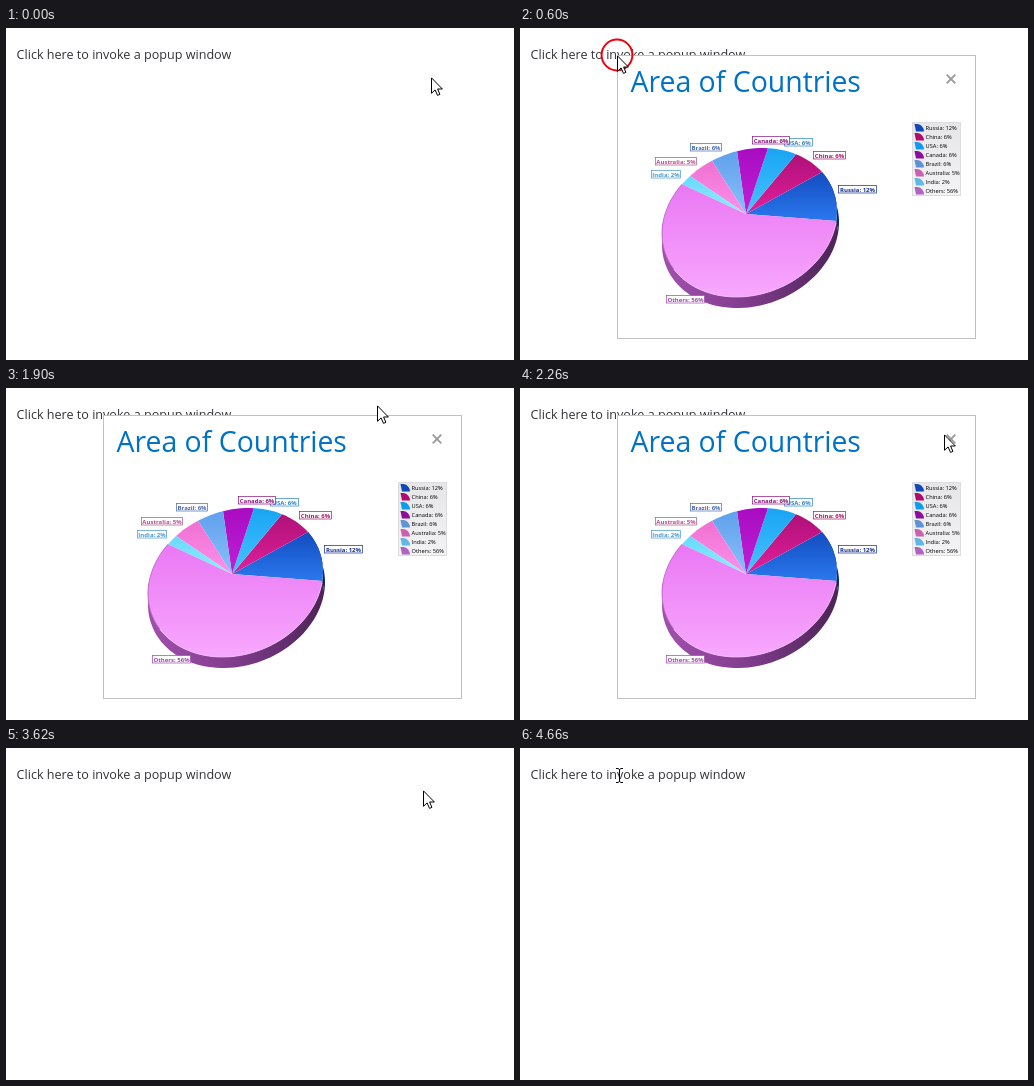
These frames come from a looping animation (508x332 px, 4690 ms). An HTML page:

```html
<!DOCTYPE html>
<html lang="en">
<head>
<meta charset="utf-8">
<title>Popup window</title>
<style>
  html, body { margin: 0; width: 100%; height: 100%; overflow: hidden; background: #fff; }
  svg { display: block; width: 508px; height: 332px; font-family: "Open Sans", "Noto Sans", sans-serif; }
</style>
</head>
<body>
<svg viewBox="0 0 508 332">
  <defs>
    <linearGradient id="rim">
      <stop offset="0" stop-color="#a050ac"/>
      <stop offset=".45" stop-color="#843e90"/>
      <stop offset="1" stop-color="#4c2456"/>
    </linearGradient>
    <linearGradient id="legendFill" x2="0" y2="1">
      <stop offset="0" stop-color="#e6e6e8"/>
      <stop offset="1" stop-color="#f3f3f5"/>
    </linearGradient>
  </defs>
  <text x="10.6" y="31" font-size="12.6" fill="#333338">Click here to invoke a popup window</text>
  <g id="popup">
    <rect x="97.5" y="27.5" width="358" height="283" fill="#fff" stroke="#c0c0c0"/>
    <text x="110.5" y="64.4" font-size="28.4" fill="#0072c6">Area of Countries</text>
    <path d="M426.7 46.7l8.6 8.6m0-8.6l-8.6 8.6" stroke="#999" stroke-width="1.8"/>
    <g id="pie"></g>
    <g id="labels" font-size="6" font-weight="700" text-anchor="middle"></g>
    <g id="legend" font-size="5.7">
      <rect x="392.5" y="94.5" width="48" height="73" fill="url(#legendFill)" stroke="#dcdcdf"/>
    </g>
  </g>
  <circle id="ring" fill="none" stroke="#f0000c" stroke-width="2"/>
  <path id="arrow" d="M.5.9V16.3L4.1 12.9 6.5 18.4 8.9 17.4 6.6 12H11.4Z" fill="#fff" stroke="#000"/>
  <path id="beam" d="M-3 -6.5H-1L.5 -5.5 2 -6.5H4M-3 7.5H-1L.5 6.5 2 7.5H4M.5 -5.5V6.5" fill="none" stroke="#000"/>
  <path id="hand" d="M-.5 12.5V2Q1 -1 2.5 2V8Q5 6 6 8 8.5 7 9 9 11 9 10.5 12V15L8.5 18V21.5H0V19L-5 13Q-6 9.5 -3 10.5Z" fill="#fff" stroke="#000"/>
</svg>
<script>
const $ = id => document.getElementById(id);

function add(parent, tag, attrs, text = '') {
  const node = document.createElementNS('http://www.w3.org/2000/svg', tag);
  for (const key in attrs) node.setAttribute(key, attrs[key]);
  node.textContent = text;
  parent.append(node);
  return node;
}

// Pie chart: angles in degrees, label box as left, top, width
const slices = [
  { name: 'Russia', share: 12, from: -34, to: 7.4, fill: ['#134cc0', '#2a78ee'], ink: '#14308c', legend: '#1048b4', box: [318, 157, 39] },
  { name: 'China', share: 6, from: -57.9, to: -34, fill: ['#b01078', '#e0209c'], ink: '#a8106c', legend: '#b00c6c', box: [293, 123, 33] },
  { name: 'USA', share: 6, from: -77.8, to: -57.9, fill: ['#18a4f4', '#48c4ff'], ink: '#2a84cc', legend: '#109cec', box: [264, 110, 29] },
  { name: 'Canada', share: 6, from: -98.2, to: -77.8, fill: ['#a80cc0', '#c020d8'], ink: '#88107c', legend: '#8c0c9c', box: [232, 108, 38] },
  { name: 'Brazil', share: 6, from: -115.4, to: -98.2, fill: ['#60a0ec', '#88c0fc'], ink: '#4868b4', legend: '#5c94d4', box: [170, 115, 32] },
  { name: 'Australia', share: 5, from: -132.8, to: -115.4, fill: ['#f070d0', '#fc90ec'], ink: '#b0508c', legend: '#cc60b0', box: [135, 129, 42] },
  { name: 'India', share: 2, from: -140.5, to: -132.8, fill: ['#68d8fc', '#90f0ff'], ink: '#4898cc', legend: '#60b8e8', box: [131, 142, 30] },
  { name: 'Others', share: 56, from: 7.4, to: 219.5, fill: ['#ea78f4', '#f8a8fe'], ink: '#9c48a8', legend: '#b064c0', box: [146, 267, 39] }
];

// Tilted ellipse; depth 1 is the bottom edge of the disc
function rimPoint(deg, depth) {
  const a = deg * Math.PI / 180;
  return [
    229.5 + 87.5 * Math.cos(a) + depth * (1 + Math.cos(a)),
    194.5 + 74.5 * Math.sin(a - .15) + depth * 11
  ];
}

function arc(from, to, depth = 0) {
  const count = Math.ceil(Math.abs(to - from) / 3);
  return Array.from({ length: count + 1 }, (_, i) =>
    rimPoint(from + (to - from) * i / count, depth));
}

const line = points => 'M' + points.map(p => p.map(v => v.toFixed(2))).join('L');

function drawSide(from, to, fill) {
  add($('pie'), 'path', { d: line([...arc(from, to), ...arc(to, from, 1)]), fill });
}
drawSide(-34, 7.4, '#0a2468');
drawSide(7.4, 190, 'url(#rim)');

slices.forEach(({ name, share, from, to, fill, legend }, i) => {
  const gradient = add(document.querySelector('defs'), 'linearGradient', { id: 'fill' + i, x2: 0, y2: 1 });
  fill.forEach((color, n) => add(gradient, 'stop', { offset: n, 'stop-color': color }));
  add($('pie'), 'path', { d: line([[226, 186], ...arc(from, to)]), fill: `url(#fill${i})` });

  const row = 100 + i * 9;
  add($('legend'), 'path', { d: `M394.5 ${row - 4}h3q6 1 6.5 7.5h-8Z`, fill: legend });
  add($('legend'), 'text', { x: 405.6, y: row + 2 }, `${name}: ${share}%`);
});
add($('pie'), 'path', { d: line(arc(150, 219.5)), fill: 'none', stroke: '#b45cc0', 'stroke-width': .8 });
add($('pie'), 'path', { d: line(arc(9, 150)), fill: 'none', stroke: '#f4bcfa', 'stroke-width': .8 });

// Canada's label overlaps the one for USA
for (const { name, share, ink, box: [x, y, width] } of slices) {
  add($('labels'), 'rect', { x: x + .5, y: y + .5, width: width - 1, height: 7.5, fill: '#fff', stroke: ink, 'stroke-width': .7 });
  add($('labels'), 'text', { x: x + width / 2, y: y + 6.5, fill: ink }, `${name}: ${share}%`);
}

// Pointer timeline: each key holds until the next one
const LOOP = 4690, OPEN = 600, CLOSE = 3030;
const keys = [];
const move = (start, step, shape, ...points) =>
  points.forEach(([x, y], i) => keys.push({ time: start + i * step, x, y, shape }));

move(0, 0, 'arrow', [425, 49]);
move(90, 0, 'beam', [99, 27]);
move(OPEN, 0, 'arrow', [97, 27]);
move(1120, 60, 'beam', [102, 26], [115, 24], [137, 21]);
move(1300, 60, 'arrow', [164, 17], [191, 14], [217, 12], [240, 10], [262, 8], [282, 7],
  [301, 7], [319, 8], [337, 10], [354, 13], [371, 17], [385, 21], [397, 26], [407, 31]);
move(2140, 0, 'hand', [415, 36]);
move(2200, 60, 'arrow', [425, 49], [424, 46]);
move(3620, 70, 'arrow', [417, 42], [390, 35], [348, 29], [298, 24], [247, 20], [202, 17], [164, 16], [135, 16],
  [118, 13], [109, 11], [104, 10], [101, 13]);
move(4450, 70, 'beam', [100, 19], [99, 23], [99, 26], [99, 27]);

const clicks = [{ time: 420, x: 97, y: 27 }, { time: 2790, x: 424, y: 46 }];
const RING_STEP = 60, RING_COUNT = 5;

const show = (node, on) => node.setAttribute('visibility', on ? 'visible' : 'hidden');

function render(time) {
  show($('popup'), time >= OPEN && time < CLOSE);

  const click = clicks.find(c => time >= c.time && time < c.time + RING_STEP * RING_COUNT);
  show($('ring'), click);
  if (click) {
    $('ring').setAttribute('cx', click.x);
    $('ring').setAttribute('cy', click.y);
    $('ring').setAttribute('r', 31 - 5.2 * Math.floor((time - click.time) / RING_STEP));
  }

  const key = keys.findLast(k => k.time <= time);
  for (const shape of ['arrow', 'beam', 'hand']) show($(shape), shape === key.shape);
  $(key.shape).setAttribute('transform', `translate(${key.x} ${key.y})`);
}

const start = performance.now();
function tick() {
  render((performance.now() - start) % LOOP);
  requestAnimationFrame(tick);
}
tick();
</script>
</body>
</html>
```
